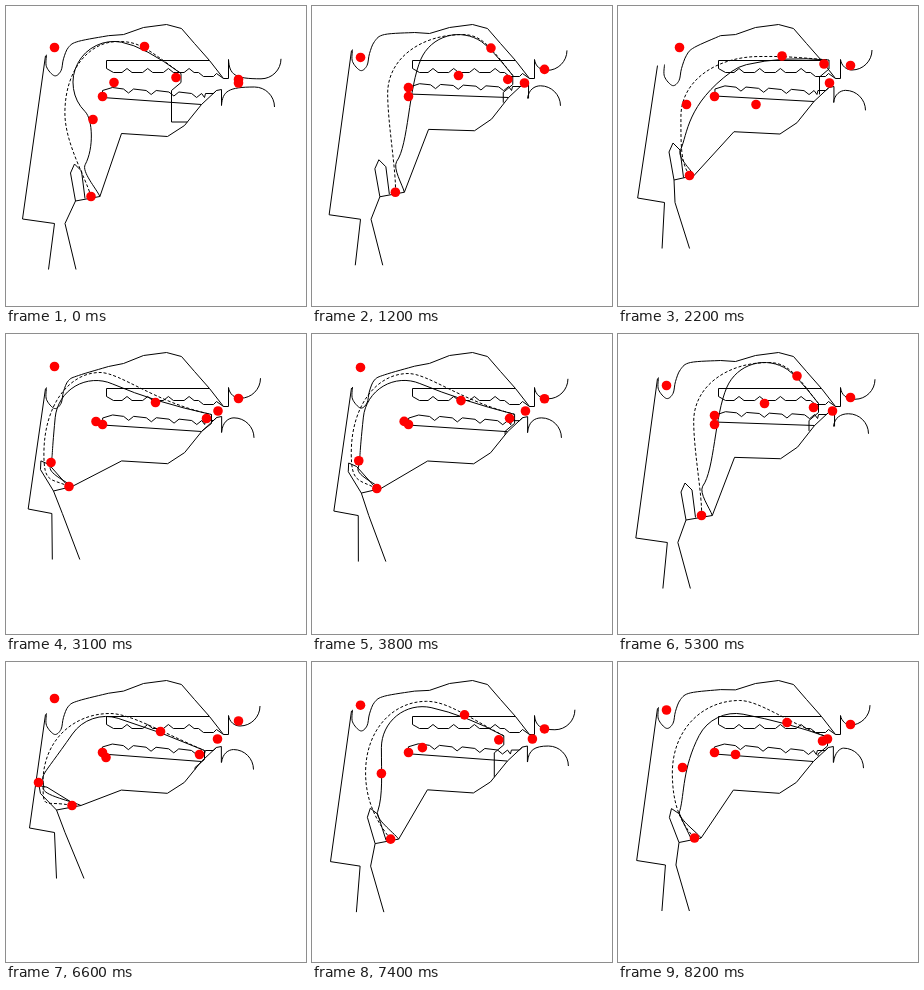
Write an HTML page that moves like this. It is 300 px wide and 300 px high and loops after 8300 ms.

```html
<!DOCTYPE html>
<html lang="en">
<head>
<meta charset="utf-8">
<title>Vocal tract</title>
<style>
html, body { margin: 0; width: 100%; height: 100%; overflow: hidden; background: #fff; }
svg { display: block; width: 100%; height: 100%; }
path { fill: none; stroke: #000; stroke-width: 1; }
#side { stroke-dasharray: 3 2; }
circle { fill: #f00; }
</style>
</head>
<body>
<svg viewBox="0 0 300 300">
  <g transform="translate(.5 .5)">
    <path d="M137 21L160 18L175 22L188 37L203 54L217 72M203 54H100"/>
    <path id="upper"/>
    <path id="walls"/>
    <path id="tongue"/>
    <path id="side"/>
    <g id="dots"></g>
  </g>
</svg>
<script>
const LOOP = 8300, STEP = 100, FIRST = 400, R = 41;

// Articulator positions: larynx, velum, lips (protrusion, height), tongue centre,
// blade, tip, root, then jaw shift and rise of the tongue sides.
const U = [84.5,190, 48,41, 232,73, 107.5,76, 138,40, 169.5,71, 86.5,113, 0,0];
const N = [71,169, 61,41, 211,59, 137.5,98, 163.5,49.5, 205.5,57.5, 68,98, -3,7];
const A = [62.5,152, 48,32, 211.5,64, 89.5,87, 149,68, 200,84, 44.5,128, -1,8];
const O = [74,165, 48,38, 220.5,65.5, 103,86.5, 146,56, 182,83, 55.5,117, 0,1];
const I = [83,181, 48,51, 214,63, 146,69, 178.5,41.5, 195,73, 96,81, -7,0];
const B = [65.5,143, 48,36, 211,58.5, 99.5,95, 154,69, 193,92, 32,120, 1,3];
const E = [76,175.5, 48,47.5, 209,62, 117,92, 168.5,60, 204,78.5, 64,105, 1,13];

const mix = (p, q, k) => p.map((v, i) => v + (q[i] - v) * k);
const lowI = I.with(1, 186).with(4, 212);
const round = mix(B, U, .73);
const keys = [
  [300, U], [1150, lowI], [1600, mix(lowI, N, .15)], [2200, N], [3100, A],
  [3900, mix(A, O, .2)], [4500, O], [4850, U], [5300, I], [5700, mix(I, B, .62)],
  [6600, B], [7100, round], [7500, mix(round, E, .5)], [8200, E]
];

// Monotone cubic through the keys: rests at extremes, never overshoots.
function slope(k, i) {
  if (k === 0 || k === keys.length - 1) return 0;
  const [[t0, a], [t1, b], [t2, c]] = keys.slice(k - 1, k + 2);
  const m = (b[i] - a[i]) / (t1 - t0), n = (c[i] - b[i]) / (t2 - t1);
  return m * n <= 0 ? 0 : 2 * m * n / (m + n);
}

function poseAt(t) {
  if (t <= keys[0][0]) return U;
  let k = 0;
  while (k < keys.length - 2 && t > keys[k + 1][0]) k++;
  const [t0, a] = keys[k], [t1, b] = keys[k + 1];
  const span = t1 - t0, s = Math.min(1, (t - t0) / span);
  const h = s * s * (3 - 2 * s);
  return a.map((v, i) => v + (b[i] - v) * h + span * s * (1 - s) *
    ((1 - s) * slope(k, i) - s * slope(k + 1, i)));
}

const $ = id => document.getElementById(id);
const line = pts => 'M' + pts.map(p => p.join(' ')).join('L');
const clamp = (v, lo, hi) => Math.max(lo, Math.min(hi, v));

function smooth(pts) {
  let d = 'M' + pts[0];
  for (let i = 0; i < pts.length - 1; i++) {
    const a = pts[i], b = pts[i + 1], p = pts[i - 1] || a, n = pts[i + 2] || b;
    const c1 = a.map((v, j) => v + (b[j] - p[j]) / 6);
    const c2 = b.map((v, j) => v - (n[j] - a[j]) / 6);
    d += `C${c1} ${c2} ${b}`;
  }
  return d;
}

// Four molars divided by notches along a sloping row.
function molars(x0, y0, pitch, rise, notch) {
  return [0, 1, 2, 3].flatMap(i => {
    const x = x0 + pitch * i, y = y0 + rise * i;
    return [[x - 5, y], [x, y + notch], [x + 5, y]];
  });
}

const upperTeeth = [[100, 54], [100, 62], [107, 66], ...molars(120.5, 66, 20.7, 0, -4),
  [192, 66], [197, 70], [207, 70], [210, 67], [217, 72], [222, 72], [222, 53]];
const lowerTeeth = [[96, 91], [96, 84], [106, 81], ...molars(122, 82.5, 22.7, 1.5, 4),
  [198, 91], [199, 87], [207, 87], [210, 84]];

// Point where the line from (x, y) touches the tongue body circle.
function touch(cx, cy, x, y, dir) {
  const a = Math.atan2(y - cy, x - cx) +
    dir * Math.acos(Math.min(1, R / Math.hypot(x - cx, y - cy)));
  return [cx + R * Math.cos(a), cy + R * Math.sin(a)];
}

function velum(wx, wy) {
  const q = (wy - 32) / 19, open = (wx - 48) / 13;
  const x = 6 * open, y = 74 - 10 * q + 9.8 * open;
  const path = smooth([[40 + x, y - 21], [40 + x, y - 9], [48 + x, y], [54.5 + x, y - 5],
    [57 + x, y - 17], [62 + x, 46 - 11 * q + 8 * open], [72 + 4 * open, 41 - 13 * q + 6 * open],
    [102, 32 - 6 * q]]) + `L117 ${29 - 2 * q}L137 21`;
  return [path, y - 20];
}

function larynx(hx, hy, vx, step, end, top) {
  const k = 190 - hy, low = step - 6 + .17 * k;
  const base = [hx - 15.5, hy + 4.5];
  // The epiglottis folds back when the tongue root presses on it.
  const tilt = clamp((5 - vx + base[0]) * 2.7, 0, 34);
  const rad = tilt * Math.PI / 180, size = 1 - .0056 * tilt;
  const c = Math.cos(rad) * size, s = Math.sin(rad) * size;
  const flap = [[-5, -28], [-1, -37], [6, -30]]
    .map(([x, y]) => [base[0] + x * c + y * s, base[1] + y * c - x * s]);
  return line([[39, top], [16 + .149 * k, hy + 22.5], [step, hy + 27], [low, hy + 73]]) +
    line([[end, hy], base, [step + 10.5, hy + 27], [low + 27.5, hy + 73]]) +
    line([base, ...flap, [hx - 6 + tilt * .25, hy + 2 - tilt * .1]]);
}

function jaw(start, shift) {
  const turn = ([x, y]) => [x - .15 * shift, y + shift * Math.min(1, x / 195)];
  const gum = [195, 98];
  return line([start, ...[[115, 127], [161, 130], [178, 119], gum, [210, 84], [215, 83], [215, 99]].map(turn)]) +
    line([[96, 91], gum].map(turn)) + line(lowerTeeth.map(turn));
}

function lips(out, height, shift) {
  const u = 63.5 + .42 * (out - 211), l = 80.5 + .75 * shift + .4 * (73 - height);
  const x = out + 42.5, z = out + 36;
  return `M222 53C223 ${u - 4} 228 ${u} ${x - 20} ${u}C${x - 9} ${u} ${x} ${u - 9} ${x} ${u - 20}` +
    `M215 ${99 + shift}C216 ${l + 4} 222 ${l} ${z - 20} ${l}C${z - 9} ${l} ${z} ${l + 9} ${z} ${l + 20}`;
}

const dots = Array.from({ length: 9 }, () => {
  const c = document.createElementNS('http://www.w3.org/2000/svg', 'circle');
  c.setAttribute('r', 4.8);
  return $('dots').appendChild(c);
});

function draw(t) {
  const [hx, hy, wx, wy, out, height, cx, cy, bx, by, tx, ty, rx, ry, shift, rise] = poseAt(t);
  const lean = rx - hx;
  const vx = hx - 7 + .63 * lean, vy = .7 * hy + 25;
  const step = 48 + .4 * (hx - 84.5) + .162 * (190 - hy);
  const end = hx + 4.5 + 2.2 * (step - 46);

  const [soft, top] = velum(wx, wy);
  $('walls').setAttribute('d', soft + larynx(hx, hy, vx, step, end, top) +
    jaw([end, hy], shift) + lips(out, height, shift));

  const front = touch(cx, cy, bx, by, -1), back = touch(cx, cy, rx, ry, 1);
  const tip = [tx + 5, ty - 4], under = tx - 4.5;
  const floor = Math.min(115.5, 98 + shift + (195 - under) * 1.2);
  const chin = 178 + (119 + shift - floor) * .81;
  $('tongue').setAttribute('d',
    `M${end} ${hy}C${vx + (end - vx) * .75} ${vy + (hy - vy) * .75} ${vx - 4} ${vy + 7} ${vx} ${vy}` +
    `C${vx + 8 + .3 * lean} ${vy - 16} ${rx} ${ry} ${back}A${R} ${R} 0 0 1 ${front}` +
    `Q${bx} ${by} ${tip}V${ty + 5}L${under} ${Math.min(ty + 13, floor)}V${floor}H${chin}`);

  const lx = .35 * (cx + rx) - 9.5, ly = (cy + ry) / 2 + 12;
  const px = cx + 4, py = cy - R - rise;
  $('side').setAttribute('d',
    `M${hx} ${hy}C${vx} ${vy + 12} ${lx} ${ly + 30} ${lx} ${ly}` +
    `C${lx} ${py + (ly - py) * .4} ${px - (px - lx) * .55} ${py} ${px} ${py}` +
    `C${px + 20} ${py} ${bx} ${by} ${tip}`);

  [[hx, hy], [wx, wy], [out, 76.5], [232, height], [cx, cy], [bx, by], [tx, ty], [rx, ry], [96, 90]]
    .forEach(([x, y], i) => {
      dots[i].setAttribute('cx', x);
      dots[i].setAttribute('cy', y);
    });
}

function frame() {
  const t = Math.floor(performance.now() % LOOP / STEP) * STEP;
  draw(t < FIRST ? 0 : t);
  requestAnimationFrame(frame);
}

$('upper').setAttribute('d', line(upperTeeth));
frame();
</script>
</body>
</html>
```
